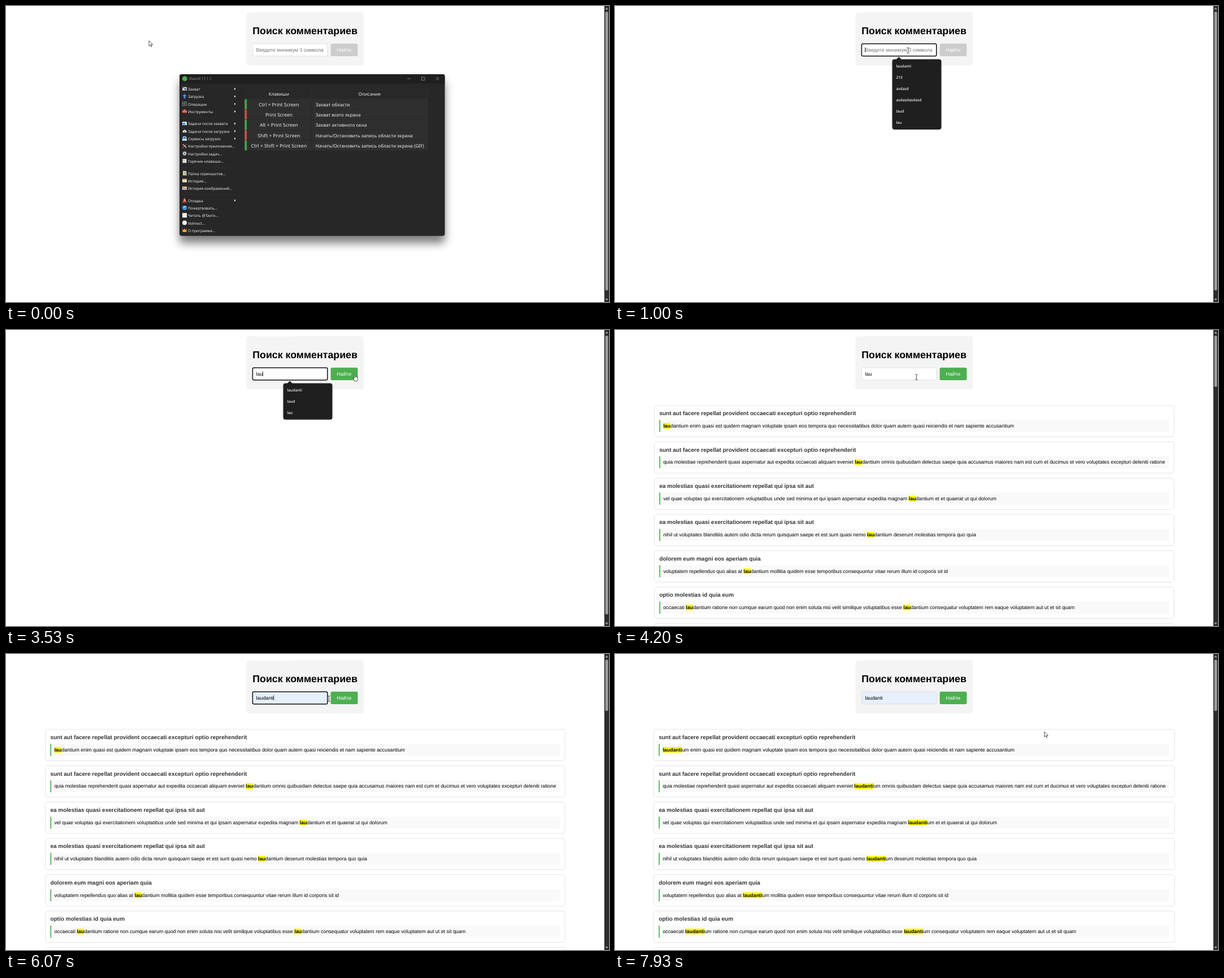
An HTML page for the animation above (8000 ms loop, 1067x525 px).

```html
<!DOCTYPE html>
<html lang="ru">
<head>
<meta charset="utf-8">
<title>Поиск комментариев</title>
<style>
html, body { margin: 0; width: 100%; height: 100%; overflow: hidden; background: #fff; }
svg { display: block; width: 1067px; height: 525px; }
text { text-rendering: geometricPrecision; font-family: "Liberation Sans", Arial, sans-serif; font-size: 8.89px; }
.h1 { font-size: 17.78px; font-weight: bold; }
.title { font-size: 10px; font-weight: bold; fill: #333; }
.hit { font-weight: bold; }
.ui text, .tip text { font-family: "Noto Sans", "Open Sans", sans-serif; fill: #f0f0f0; }
.tip text { font-family: "Open Sans", "Noto Sans", sans-serif; font-size: 6.67px; font-weight: 600; fill: #f1ede6; }
.ui .menu { font-size: 6.6px; }
.ui .cell { font-size: 8.1px; }
.ui .keys { font-size: 8.45px; text-anchor: middle; }
.ui .head { font-size: 8px; text-anchor: middle; }
.ui .cap { font-size: 6.25px; fill: #969696; }
</style>
</head>
<body>
<svg id="stage" viewBox="0 0 1067 525" xmlns="http://www.w3.org/2000/svg"></svg>
<script>
const stage = document.getElementById('stage');
const rect = (x, y, w, h, fill, more = '') =>
  `<rect x="${x}" y="${y}" width="${w}" height="${h}" fill="${fill}" ${more}/>`;
const path = (d, fill, more = '') => `<path d="${d}" fill="${fill}" ${more}/>`;
const dot = (x, y, r, fill) => `<circle cx="${x}" cy="${y}" r="${r}" fill="${fill}"/>`;
const text = (x, y, s, cls = '', more = '') => `<text x="${x}" y="${y}" class="${cls}" ${more}>${s}</text>`;
const line = (d, color, w) => path(d, 'none', `stroke="${color}" stroke-width="${w}"`);

// Search results
const HEADS = [
  'sunt aut facere repellat provident occaecati excepturi optio reprehenderit',
  'ea molestias quasi exercitationem repellat qui ipsa sit aut',
  'dolorem eum magni eos aperiam quia',
  'optio molestias id quia eum'
];
const POSTS = [
  [0, 'laudantium enim quasi est quidem magnam voluptate ipsam eos tempora quo necessitatibus dolor quam autem quasi reiciendis et nam sapiente accusantium'],
  [0, 'quia molestiae reprehenderit quasi aspernatur aut expedita occaecati aliquam eveniet laudantium omnis quibusdam delectus saepe quia accusamus maiores nam est cum et ducimus et vero voluptates excepturi deleniti ratione'],
  [1, 'vel quae voluptas qui exercitationem voluptatibus unde sed minima et qui ipsam aspernatur expedita magnam laudantium et et quaerat ut qui dolorum'],
  [1, 'nihil ut voluptates blanditiis autem odio dicta rerum quisquam saepe et est sunt quasi nemo laudantium deserunt molestias tempora quo quia'],
  [2, 'voluptatem repellendus quo alias at laudantium mollitia quidem esse temporibus consequuntur vitae rerum illum id corporis sit id'],
  [3, 'occaecati laudantium ratione non cumque earum quod non enim soluta nisi velit similique voluptatibus esse laudantium consequatur voluptatem rem eaque voluptatem aut ut et sit quam']
];
const PITCH = 64.43;

const frame = (left, y) => rect(left, y, 1058.7 - 2 * left, 55.6, '#fff', 'rx="4.2" stroke="#ddd" stroke-width=".8"');

function results(id, query, left) {
  let out = '';
  POSTS.forEach(([head, body], i) => {
    const y = 133.7 + i * PITCH;
    const marked = body.split(query).join(`<tspan class="hit">${query}</tspan>`);
    out += frame(left, y) +
      text(left + 8.9, y + 17.4, HEADS[head], 'title') +
      rect(left + 8.9, y + 25.8, 1058.7 - 2 * left - 17.8, 21.4, '#f9f9f9') +
      rect(left + 8.9, y + 25.8, 1.7, 21.4, '#4caf50') +
      text(left + 15.9, y + 39.2, marked, 'body');
  });
  return `<g id="${id}">${out}${frame(left, 133.7 + POSTS.length * PITCH)}</g>`;
}

// Yellow boxes behind the matches, measured from the laid-out text
function highlight(id, query) {
  for (const t of document.querySelectorAll(`#${id} .body`)) {
    const s = t.textContent;
    for (let i = s.indexOf(query); i >= 0; i = s.indexOf(query, i + 1)) {
      const x = t.getStartPositionOfChar(i).x;
      const end = t.getEndPositionOfChar(i + query.length - 1).x;
      t.insertAdjacentHTML('beforebegin', rect(x, +t.getAttribute('y') - 8, end - x, 10.1, '#ff0'));
    }
  }
}

// Application window
const card = path('M0 1H8V7H0Z', '#e6e0cf') + path('M0 1H8V2.5H0Z', '#d79a4a');
const ICONS = [
  path('M0 1H8V7H0Z', '#cfd3da') + dot(5.2, 4.2, 1.7, '#56606e') + path('M0 1H3V3H0Z', '#d05a5a'),
  path('M4 0L7.6 3.8H5.3V8H2.7V3.8H.4Z', '#4a94e6'),
  [0, 1, 2, 3, 4, 5, 6, 7, 8].map(i => rect(i % 3 * 2.9, (i / 3 | 0) * 2.9, 2, 2,
    ['#e05050', '#58b058', '#4c8fe0'][(i + (i / 3 | 0)) % 3])).join(''),
  path('M0 2H8V7H0Z', '#d8453c') + path('M2.5 1H5.5V2H2.5ZM0 4H8V4.8H0Z', '#f1d6d0'),
  path('M0 1H8V7H0Z', '#dce8f4') + path('M.7 3H5V6.3H.7Z', '#4591d6'),
  path('M1.7 7A1.7 1.7 0 0 1 1.6 3.7A2.6 2.6 0 0 1 6.4 3.5A1.8 1.8 0 0 1 6.3 7Z', '#e4e9f0') + path('M4 3.8L5.5 5.8H2.5Z', '#56606e'),
  path('M1.5 0H6.5L8 5V8H0V5Z', '#d5dfeb') + path('M2 .8H6L6.8 4.5H1.2Z', '#3f87cf'),
  line('M.5 7.5L7 1', '#d4554c', 1.3) + line('M1 1L7.3 7.3', '#c9ced6', 1.3),
  line('M4 0V8M0 4H8M1.2 1.2L6.8 6.8M6.8 1.2L1.2 6.8', '#e2e2e2', 1.1) + dot(4, 4, 2.5, '#e2e2e2') + dot(4, 4, 1.1, '#272727'),
  path('M.4.4H7.4V7.4H.4Z', '#e9e9e9') + line('M2 2.5L4 4L2 5.5', '#777', .7),
  path('M1 0H5.5L7.5 1V8H1Z', '#f0d46a') + path('M3 2H7V7H3Z', '#9fb9cf'),
  card,
  card + path('M1 3.5H4V6H1Z', '#5b94c8') + path('M5 3.5H7V6H5Z', '#b45f5a'),
  path('M3.3 0H4.7L6.7 6.5H8V8H0V6.5H1.3Z', '#e24b3b') + path('M2.5 3H5.5L5.9 4.4H2.1Z', '#f4e4df'),
  dot(4, 4, 4, '#3d97dc') + path('M1.2 2.6A3.5 3.5 0 0 1 6.8 2.6Q4 4 1.2 2.6Z', '#a5d4f5'),
  rect(0, 0, 8, 8, '#f2f2f2'),
  dot(4, 4, 4, '#f2f2f2'),
  path('M0 1L2.3 3.6L4 .6L5.7 3.6L8 1L7.2 7.2H.8Z', '#efa93a')
];
// A trailing ">" marks a submenu, an empty entry a separator
const MENU = ['Захват>', 'Загрузка>', 'Операции>', 'Инструменты>', '',
  'Задачи после захвата>', 'Задачи после загрузки>', 'Сервисы загрузок>', 'Настройки приложения...',
  'Настройки задач...', 'Горячие клавиши...', '',
  'Папка скриншотов...', 'История...', 'История изображений...', '',
  'Отладка>', 'Пожертвовать...', 'Читать @Tavrix...', 'Volmect...', 'О программе...'];
const HOTKEYS = [
  ['Ctrl + Print Screen', 'Захват области', 1],
  ['Print Screen', 'Захват всего экрана', 0],
  ['Alt + Print Screen', 'Захват активного окна', 1],
  ['Shift + Print Screen', 'Начать/Остановить запись области экрана', 0],
  ['Ctrl + Shift + Print Screen', 'Начать/Остановить запись области экрана (GIF)', 1]
];

function appWindow() {
  let out = rect(307, 121, 469.5, 286.7, '#000', 'rx="4" opacity=".5" filter="url(#soft)" transform="translate(0 13)"') +
    rect(307, 121, 469.5, 286.7, '#272727', 'rx="4"') +
    path('M307 137.5V125a4 4 0 0 1 4-4H772.5a4 4 0 0 1 4 4V137.5Z', '#1f1f1f') +
    dot(316.3, 128.9, 4.3, '#4caf50') + text(323.8, 131.2, 'ShareX 17.1.1', 'cap') +
    line('M710.3 129H716M735.5 126.3H740.8V131.6H735.5ZM760.8 126.3L766.2 131.7M766.2 126.3L760.8 131.7', '#a8a8a8', .7);
  let y = 147.4, n = 0;
  for (const item of MENU) {
    if (!item) {
      out += rect(311, y - 2.5, 97, .7, '#303030');
      y += 8.2;
      continue;
    }
    const sub = item.endsWith('>');
    out += `<g transform="translate(312 ${y - 4.6})">${ICONS[n++]}</g>` +
      text(322, y + 2.5, sub ? item.slice(0, -1) : item, 'menu');
    if (sub) out += path(`M404 ${y - 2.4}L406.6 ${y - .3}L404 ${y + 1.8}Z`, '#f0f0f0');
    y += 13.32;
  }
  out += rect(422.3, 147.3, 324.6, 17.6, '#282828', 'stroke="#323232" stroke-width=".6"') +
    rect(540.6, 147.3, .6, 17.6, '#323232') +
    text(482.8, 159.4, 'Клавиши', 'head') + text(643.2, 159.4, 'Описание', 'head');
  HOTKEYS.forEach(([keys, what, on], i) => {
    const top = 165.4 + i * 18.3;
    out += rect(422.3, top, 118, 17.6, '#2f2f2f') + rect(541.2, top, 205.7, 17.6, '#2f2f2f') +
      rect(422.3, top, 3.8, 17.6, on ? '#4ba04e' : '#c5524f') +
      text(482.9, top + 12.3, keys, 'keys') + text(547.8, top + 12.3, what, 'cell');
  });
  return `<g id="app" class="ui">${out}</g>`;
}

stage.innerHTML = `<defs><filter id="soft" x="-10%" y="-15%" width="120%" height="130%"><feGaussianBlur stdDeviation="8"/></filter>
  <filter id="near" x="-10%" y="-10%" width="120%" height="125%"><feGaussianBlur stdDeviation="1"/></filter></defs>` +
  rect(0, 0, 1067, 525, '#fff') +
  results('wide', 'laudanti', 68.5) + results('short', 'lau', 69.5) +
  rect(425.4, 11.3, 208, 94, '#f4f4f4', 'rx="4.4"') +
  text(436.3, 50, 'Поиск комментариев', 'h1') +
  rect(436.4, 67, 132.4, 21.7, '#fff', 'id="field" rx="2.3"') +
  text(442.6, 80.6, '', '', 'id="value"') +
  rect(0, 73.2, .7, 9, '#000', 'id="caret"') +
  rect(574.6, 66.7, 47.8, 22.2, '#ccc', 'id="button" rx="2.2"') +
  text(585.6, 80.6, 'Найти', '', 'fill="#fff"') +
  `<g id="tip" class="tip"></g>` + appWindow() +
  rect(1058.7, 0, 8.3, 525, '#2c2c2c') +
  path('M1060.3 6.2L1062.9 2.6L1065.5 6.2ZM1060.3 519L1062.9 522.6L1065.5 519Z', '#9f9f9f') +
  rect(1060.4, 10, 5, 494.5, '#9f9f9f', 'id="thumb" rx="2.5"') +
  `<g id="mouse">
    ${path('M0 0V9.4L2.2 7.4L3.7 10.8L5.1 10.2L3.7 7H6.6Z', '#fff', 'id="arrow" stroke="#111" stroke-width=".7"')}
    <g id="beam">${line('M-2.3 -4.6H-.6L0 -4.1L.6 -4.6H2.3M0 -4.1V4.4M-2.3 4.9H-.6L0 4.4L.6 4.9H2.3', '#222', .8)}</g>
    ${path('M-1 1Q0 -.6 1 1V5Q1.7 4.3 2.4 5.2Q3.2 4.6 3.8 5.6Q5.2 5.1 5.2 6.8V8.8Q5 10.3 4.2 11V12.4H-.8V11.2L-3.3 7.6Q-3.5 6.2 -2.2 6.6L-1 7.8Z', '#fff', 'id="hand" stroke="#111" stroke-width=".7"')}
  </g>`;
highlight('wide', 'laudanti');
highlight('short', 'lau');

const $ = id => document.getElementById(id);
const show = (id, on) => $(id).setAttribute('display', on ? 'inline' : 'none');
const set = (id, attrs) => { for (const k in attrs) $(id).setAttribute(k, attrs[k]); };

// All times below are ticks of 1/15 s
const TRACK = [
  [0, 253, 61.5], [1, 270, 58], [4, 400, 40], [7, 592, 47], [9, 570, 66], [12, 518.7, 78.5],
  [17, 518.7, 78.5], [19, 515, 78.5], [49, 515, 78.5], [53, 617.3, 78.2], [57, 617.3, 78.2],
  [63, 533.3, 83.5], [79, 533.3, 83.5], [80, 532.2, 83.5], [82, 532.2, 83.5], [85, 512, 104],
  [87, 512, 104], [91, 571.5, 79], [94, 608, 78.2], [102, 608, 78.2], [103, 520, 101],
  [104, 435.5, 124.5], [116, 435.5, 124.5], [119, 759.7, 137.6]
];
const TYPED = [[0, ''], [29, 'l'], [36, 'la'], [47, 'lau'], [85, 'laudanti']];
const EDITS = [15, 29, 36, 47, 80, 88];
const last = (list, n) => list.filter(e => (e[0] ?? e) <= n).pop();

function mouseAt(n) {
  const i = Math.max(1, TRACK.findIndex(k => k[0] >= n));
  const [a, ax, ay] = TRACK[i - 1], [b, bx, by] = TRACK[i];
  const k = (n - a) / (b - a);
  return [ax + (bx - ax) * k, ay + (by - ay) * k];
}

function tipRows(n) {
  if (n >= 15 && n < 30) return ['laudanti', '213', 'asdasd', 'asdasdasdasd', 'laud', 'lau'];
  if (n >= 30 && n < 55) return ['laudanti', 'laud', 'lau'];
  if (n >= 80 && n < 88) return ['laudanti', 'lau', 'laud'];
  return [];
}

function drawTip(rows, hover) {
  if (!rows.length) return '';
  const h = 4 + rows.length * 20.07;
  return rect(490.6, 95.2, 86.8, h, '#000', 'rx="4" opacity=".3" filter="url(#near)"') +
    path('M497.4 95L502.2 90.2L507 95Z', '#1f1f1f') +
    rect(490.6, 94.5, 86.8, h, '#1f1f1f', 'rx="3.8"') +
    (hover ? rect(490.6, 96.5, 86.8, 20.07, '#3a3a3a') : '') +
    rows.map((s, i) => text(497.4, 109 + i * 20.07, s)).join('');
}

function draw(n) {
  const value = last(TYPED, n)[1];
  const focus = n >= 15 && n < 55 || n >= 80 && n < 96;
  const found = n >= 58 && n < 96 || n >= 99;
  const rows = tipRows(n);
  show('app', n < 15);
  show('short', found && n < 97);
  show('wide', found && n >= 97);
  set('field', {
    fill: n >= 85 ? '#e6f0fd' : '#fff',
    stroke: focus ? '#101010' : '#d6d6d6',
    'stroke-width': focus ? 1.5 : .7
  });
  $('value').textContent = value || 'Введите минимум 3 символа';
  set('value', { fill: value ? '#000' : '#757575' });
  const end = value ? $('value').getComputedTextLength() : 0;
  set('caret', { x: 442.4 + end });
  show('caret', focus && Math.floor((n - last(EDITS, n)) / 8) % 2 === 0);
  set('button', { fill: value.length > 2 ? '#4caf50' : '#ccc' });
  $('tip').innerHTML = drawTip(rows, n >= 85);
  set('thumb', { height: found ? 91 : 494.5 });

  const [x, y] = mouseAt(n);
  const inside = (l, t, r, b) => x > l && x < r && y > t && y < b;
  const hand = value.length > 2 && inside(574.6, 66, 623, 89);
  const beam = inside(436, 66, 573, 90) || inside(437, 34, 622, 54);
  set('mouse', { transform: `translate(${x} ${y})` });
  show('hand', hand);
  show('beam', beam && !hand);
  show('arrow', !beam && !hand);
}

let start, shown = -1;
function loop(now) {
  start ??= now;
  const n = Math.min(119, Math.floor((now - start) % 8000 * .015 + .1));
  if (n !== shown) draw(shown = n);
  requestAnimationFrame(loop);
}
draw(0);
requestAnimationFrame(loop);
</script>
</body>
</html>
```
